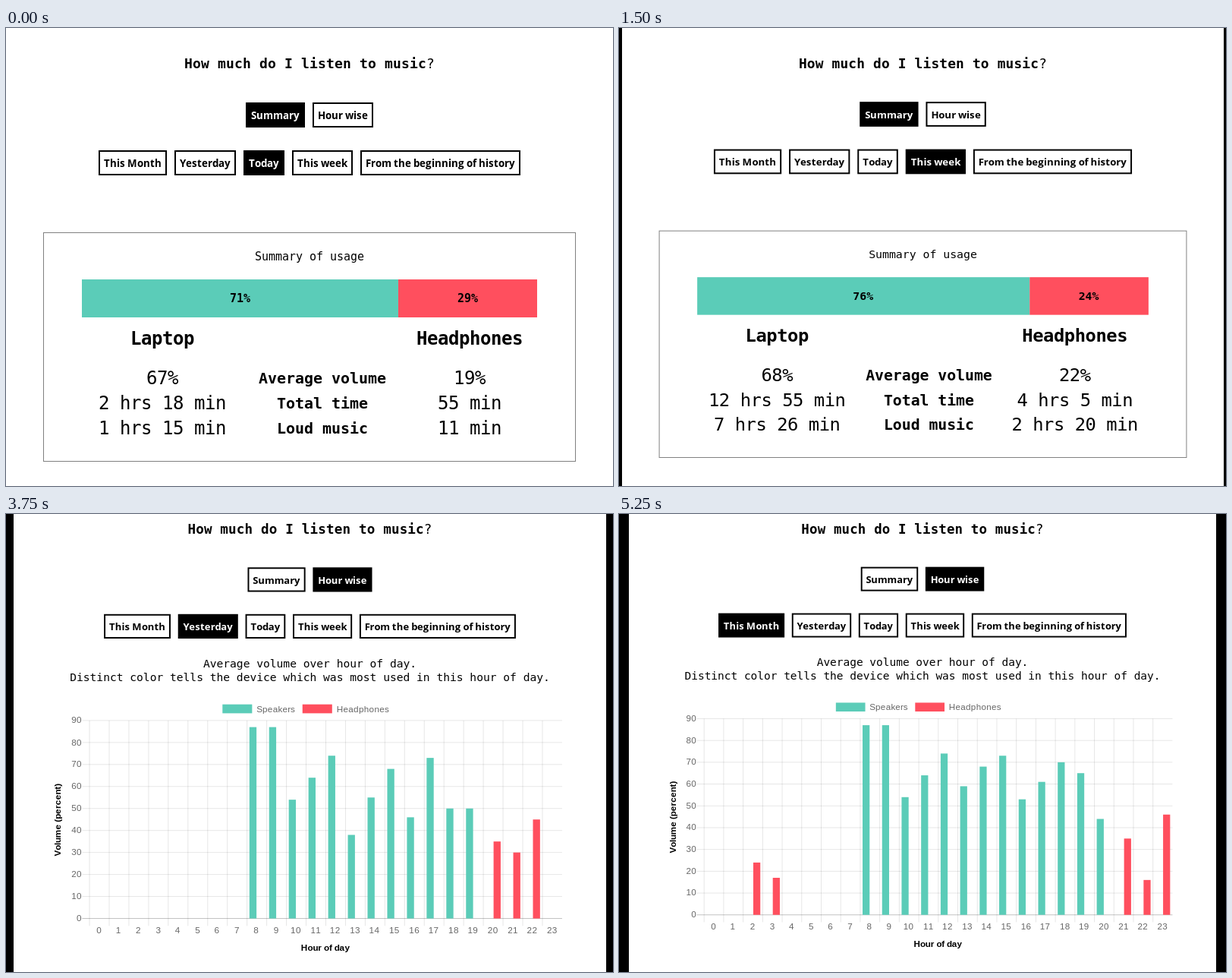
An HTML page with a canvas that plays this animation: 800 px wide and 603 px high, repeating every 6000 ms.

```html
<!DOCTYPE html>
<html lang="en">
<head>
<meta charset="utf-8">
<title>How much do I listen to music?</title>
<style>
  html, body { margin: 0; height: 100%; overflow: hidden; background: #000; }
  canvas { display: block; }
</style>
</head>
<body>
<canvas id="stage" width="800" height="603"></canvas>
<script>
const ctx = document.getElementById('stage').getContext('2d');
const STEP = 750;
const TEAL = '#5bccb8', RED = '#ff4f5e';
const mono = (size, weight = '') => `${weight} ${size}px "DejaVu Sans Mono", monospace`;
const chartFont = (weight = '') => `${weight} 12px "Liberation Sans", Arial, sans-serif`;
const BUTTON_FONT = 'bold 13.333px "Open Sans", sans-serif';
const VIEWS = ['Summary', 'Hour wise'];
const PERIODS = ['This Month', 'Yesterday', 'Today', 'This week', 'From the beginning of history'];

// Hourly volume: positive = speakers, negative = headphones
const none = n => Array(n).fill(0);
const night = [0, 0, -24, -17, ...none(4)];
const day = [87, 87, 54, 64, 74, 59, 68, 73];

// left/width: the white page, shrunk between black side bars
const scenes = [
  { left: 0, width: 800, period: 'Today', share: [71, 29], split: 517,
    laptop: ['67%', '2 hrs 18 min', '1 hrs 15 min'], phones: ['19%', '55 min', '11 min'] },
  { left: 2, width: 797, period: 'Yesterday', share: [75, 25], split: 536,
    laptop: ['68%', '3 hrs 42 min', '2 hrs 10 min'], phones: ['21%', '1 hrs 14 min', '38 min'] },
  { left: 4, width: 793, period: 'This week', share: [76, 24], split: 542,
    laptop: ['68%', '12 hrs 55 min', '7 hrs 26 min'], phones: ['22%', '4 hrs 5 min', '2 hrs 20 min'] },
  { left: 6, width: 788, period: 'This Month', share: [87, 13], split: 601,
    laptop: ['68%', '12 hrs 35 min', '7 hrs 15 min'], phones: ['20%', '1 hrs 55 min', '56 min'] },
  { left: 10, width: 781, period: 'Today',
    hours: [...night, ...none(5), 81, 81, 78, 58, 48, 88] },
  { left: 10, width: 781, period: 'Yesterday',
    hours: [...none(8), ...day.slice(0, 5), 38, 55, 68, 46, 73, 50, 50, -35, -30, -45] },
  { left: 15, width: 771, period: 'This week',
    hours: [...night, ...day, 52, 68, 69, 50, -35, -30, -45, -46] },
  { left: 13, width: 774, period: 'This Month',
    hours: [...night, ...day, 53, 61, 70, 65, 44, -35, -16, -46] }
];

function rect(x, y, w, h, color) {
  ctx.fillStyle = color;
  ctx.fillRect(x, y, w, h);
}

// Letter advances snap to whole pixels, as in hinted text
const advance = char => Math.round(ctx.measureText(char).width);

function textWidth(str, font) {
  ctx.font = font;
  return [...str].reduce((sum, char) => sum + advance(char), 0);
}

function text(str, x, y, font, color = '#000', align = 0.5) {
  x = Math.floor(x - textWidth(str, font) * align);
  ctx.fillStyle = color;
  for (const char of str) {
    ctx.fillText(char, x, y);
    x += advance(char);
  }
}

function buttons(labels, active, y) {
  const widths = labels.map(label => textWidth(label, BUTTON_FONT) + 14);
  let x = 400 - (widths.reduce((a, b) => a + b) + 10 * (labels.length - 1)) / 2;
  labels.forEach((label, i) => {
    const on = label === active;
    rect(x, y, widths[i], 33, '#000');
    if (!on) rect(x + 2, y + 2, widths[i] - 4, 29, '#fff');
    text(label, x + 7, y + 22, BUTTON_FONT, on ? '#fff' : '#000', 0);
    x += widths[i] + 10;
  });
}

function header(view, period, top) {
  text('How much do I listen to music', 235, top + 53, mono(18, 'bold'), '#000', 0);
  text('?', 554, top + 53, mono(18), '#000', 0);
  buttons(VIEWS, view, top + 98);
  buttons(PERIODS, period, top + 161);
}

function summary({ share, split, laptop, phones }) {
  ctx.strokeStyle = '#808080';
  ctx.lineWidth = 1;
  ctx.strokeRect(49.5, 269.5, 701, 301);
  text('Summary of usage', 400, 306, mono(15));

  rect(100, 331, split - 100, 50, TEAL);
  rect(split, 331, 700 - split, 50, RED);
  text(share[0] + '%', (100 + split) / 2, 361, mono(15, 'bold'));
  text(share[1] + '%', (split + 700) / 2, 361, mono(15, 'bold'));

  const columns = [
    { head: 'Laptop', cells: laptop, font: mono(24), rise: 0 },
    { head: '', cells: ['Average volume', 'Total time', 'Loud music'], font: mono(20, 'bold'), rise: 1 },
    { head: 'Headphones', cells: phones, font: mono(24), rise: 0 }
  ];
  // Columns share the table width in proportion to their widest cell
  const widths = columns.map(({ head, cells, font }) => 2 + Math.max(
    textWidth(head, mono(24, 'bold')), ...cells.map(cell => textWidth(cell, font))));
  const stretch = 592 / widths.reduce((a, b) => a + b);
  let x = 102;
  columns.forEach(({ head, cells, font, rise }, i) => {
    const width = widths[i] * stretch, center = x + width / 2 + 0.3;
    text(head, center, 417, mono(24, 'bold'));
    cells.forEach((cell, row) => text(cell, center, 469 + 33 * row - rise, font));
    x += width + 2;
  });
}

function hourChart({ hours }) {
  const left = 102.5, right = 740.5, top = 278.5, bottom = 545.5;
  const slot = (right - left) / 24, unit = (bottom - top) / 90;
  const grey = '#666', grid = 'rgba(0,0,0,.1)';

  text('Average volume over hour of day.', 400, 207, mono(15));
  text('Distinct color tells the device which was most used in this hour of day.', 400, 225, mono(15));

  rect(282, 256.75, 40, 12, TEAL);
  text('Speakers', 328, 267, chartFont(), grey, 0);
  rect(390, 256.75, 40, 12, RED);
  text('Headphones', 436, 267, chartFont(), grey, 0);

  for (let v = 0; v <= 90; v += 10) {
    const y = bottom - v * unit;
    rect(left - 10, y - 0.5, right - left + 10, 1, v ? grid : 'rgba(0,0,0,.25)');
    text(String(v), left - 10, Math.round(y + 3.4), chartFont(), grey, 1);
  }
  for (let h = 0; h < 24; h++) {
    const x = left + h * slot;
    rect(x - 0.5, top, 1, bottom - top + 10, grid);
    text(String(h), x + slot / 2, 565, chartFont(), grey);
  }

  const barWidth = slot * 0.36;
  hours.forEach((v, h) => {
    const center = left + (h + 0.5 + (v < 0 ? 0.2 : -0.2)) * slot;
    const height = Math.abs(v) * unit;
    rect(center - barWidth / 2, bottom - height, barWidth, height, v < 0 ? RED : TEAL);
  });

  text('Hour of day', 421.5, 589, chartFont('bold'));
  ctx.save();
  ctx.translate(60, 412.5);
  ctx.rotate(-Math.PI / 2);
  text('Volume (percent)', 0, 4, chartFont('bold'));
  ctx.restore();
}

function draw(time) {
  const scene = scenes[Math.floor(time / STEP) % scenes.length];
  const scale = scene.width / 800;
  ctx.setTransform(1, 0, 0, 1, 0, 0);
  rect(0, 0, 800, 603, '#000');
  rect(scene.left, 0, scene.width, 603, '#fff');
  ctx.setTransform(scale, 0, 0, scale, scene.left, 0);
  if (scene.hours) {
    header('Hour wise', scene.period, -26);
    hourChart(scene);
  } else {
    header('Summary', scene.period, 0);
    summary(scene);
  }
}

const start = performance.now();
function tick() {
  draw(performance.now() - start);
  requestAnimationFrame(tick);
}
tick();
</script>
</body>
</html>
```
